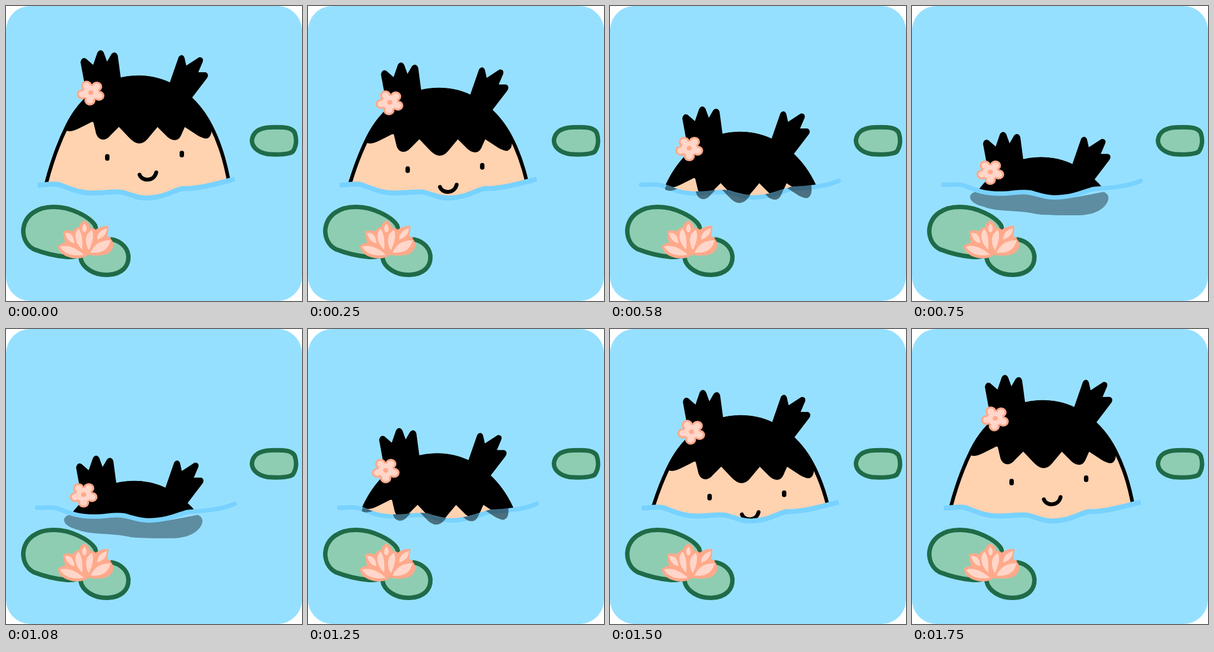
An HTML page that plays this animation: 532 by 530 pixels, repeating every 1.83 s.

```html
<!DOCTYPE html>
<html lang="en">
<head>
<meta charset="utf-8">
<title>Pond dip</title>
<style>
  html, body { margin: 0; width: 100%; height: 100%; overflow: hidden; background: #fff; }
  svg { display: block; width: 100vw; height: 100vh; }
  .pad { fill: #8ecdb2; stroke: #1f6b48; stroke-width: 8; stroke-linejoin: round; }
  .pale { fill: #ffd6c9; }
  .coral { fill: #ffa98b; }
  .hair { fill: #000; stroke: #000; stroke-width: 6; stroke-linejoin: round; }
</style>
</head>
<body>
<svg viewBox="0 0 532 530" xmlns="http://www.w3.org/2000/svg">
  <defs>
    <clipPath id="air"><path id="airPath"/></clipPath>
    <clipPath id="sea"><path id="seaPath"/></clipPath>
    <g id="hair" class="hair">
      <path d="M109 221 C135 165 180 128 238 128 C300 128 345 170 366 217 Q368 232 361 235
        Q357 236 346 230 L320 213 L312 231 Q309 238 303 238 Q298 238 292 233 L272 213
        L252 237 Q246 244 239 244 Q232 244 222 233 L203 213 L185 231 Q180 237 174 237
        Q168 237 165 229 L160 208 Q157 203 150 207 L130 217 Q116 224 109 221 Z"/>
      <path d="M146 150 L137 101 Q138 95 142 97 L158 111 L167 85 Q170 80 173 85 L181 107
        L192 88 Q196 84 198 90 L204 135 Z"/>
      <path d="M296 142 L313 93 Q316 89 318 94 L322 112 L348 95 Q353 95 350 101 L341 122
        L358 122 Q362 124 358 129 L332 163 Z"/>
    </g>
  </defs>

  <rect width="532" height="530" rx="44" fill="#96e0ff"/>

  <path id="shade" fill="#5e8da1" d="M105 340 Q110 332 125 334 C150 338 165 341 200 338
    C225 340 240 348 255 347 C290 346 310 340 345 334 Q354 338 353 347 C350 360 335 375 300 376
    C270 376 240 376 225 374 C190 366 150 370 130 361 C110 356 102 348 105 340 Z"/>

  <g clip-path="url(#air)">
    <g id="head">
      <path fill="#ffd2b0" stroke="#000" stroke-width="6.5" d="M66 350 C72 310 90 255 110 215
        C135 165 180 128 238 128 C300 128 345 170 368 215 C386 250 398 290 406 350"/>
      <use href="#hair"/>
      <rect x="178" y="266" width="8" height="12" rx="4"/>
      <rect x="312" y="260" width="8" height="12" rx="4"/>
      <path fill="none" stroke="#000" stroke-width="7" stroke-linecap="round"
        d="M240 303 C244 315 266 316 270 299"/>
    </g>
  </g>

  <path id="line" fill="none" stroke="#78d2ff" stroke-linejoin="round"/>
  <g id="sunk" clip-path="url(#sea)" opacity=".5"><use id="sunkHair" href="#hair"/></g>
  <g clip-path="url(#air)"><g id="bloom"></g></g>

  <path class="pad" d="M31 403 C33 375 58 360 88 361 C115 361 150 378 160 394
    C168 415 150 453 110 451 C85 449 68 444 50 437 C37 430 31 417 31 403 Z"/>
  <path class="pad" d="M134 453 C137 470 158 484 183 483 C208 482 221 468 220 449
    C218 430 200 419 185 419 C160 416 132 430 134 453 Z"/>
  <path class="pad" d="M442 241 C444 226 455 219 475 218 C500 217 514 218 519 228
    C523 240 522 253 515 262 C505 268 480 267 470 266 C452 263 442 253 442 241 Z"/>

  <path class="coral" d="M93 431 Q99 426 106 425 L102 405 Q112 401 121 405 Q123 398 131 397
    Q134 388 141 385 Q149 389 152 399 Q158 398 161 402 Q172 394 184 395 Q184 407 181 415
    Q190 413 188 418 Q194 424 193 432 Q190 443 178 447 Q160 450 147 447 Q140 455 120 453
    Q95 448 93 431 Z"/>
  <path class="pale" d="M141 391 Q147 397 144 405 Q141 408 138 405 Q135 397 141 391
    M130 400 Q139 410 137 438 Q121 422 126 406 Z
    M154 402 Q161 413 149 439 Q140 424 146 410 Z
    M106 408 Q121 405 123 426 Q111 425 106 408
    M181 399 Q182 413 164 420 Q163 405 181 399
    M97 432 Q118 427 140 447 Q108 452 97 432
    M188 421 Q162 420 152 443 Q182 446 188 421"/>
</svg>
<script>
const LOOP = 1830, STEPS = 22;
const $ = id => document.getElementById(id);

// step, head x, head y, flower x, flower y
const KEYS = [
  [0, 0, 0, 0, 0], [5, -5, 50, -10, 43], [7, -4, 101, -10, 100],
  [11, -8, 172, -13, 165], [13, -8, 148, -13, 142], [16, -5, 73, -12, 75],
  [18, -3, 30, -6, 29], [21, -3, 3, -3, 5], [22, 0, 0, 0, 0]
];

const CALM = "M57 322 C75 321 86 318 96 321 C120 330 135 337 160 336 C180 336 195 332 210 335 " +
  "C225 339 238 346 255 345 C290 343 300 331 318 328 C345 329 380 319 411 311";
const RIPPLE = "M56 321 C70 322 80 318 95 323 C118 332 130 337 160 337 C180 337 195 332 212 335 " +
  "C228 339 240 344 257 344 C290 343 305 335 325 329 C345 327 385 326 411 314";

function slope(k, c) {
  const a = KEYS[k - 1], b = KEYS[k + 1];
  if (!a || !b || KEYS[k][0] === 11) return 0;
  return (b[c] - a[c]) / (b[0] - a[0]);
}

function pose(step, c) {
  let k = 0;
  while (KEYS[k + 1][0] <= step) k++;
  const a = KEYS[k], b = KEYS[k + 1], w = b[0] - a[0];
  const u = (step - a[0]) / w, v = 1 - u;
  return a[c] * v * v * (1 + 2 * u) + b[c] * u * u * (3 - 2 * u)
    + w * u * v * (slope(k, c) * v - slope(k + 1, c) * u);
}

function petals(radius, cls) {
  let out = "";
  for (let n = 0; n < 5; n++) {
    const a = (n * 72 + 18) * Math.PI / 180;
    out += `<circle class="${cls}" cx="${15 * Math.cos(a)}" cy="${15 * Math.sin(a)}" r="${radius}"/>`;
  }
  return out;
}
$("bloom").innerHTML = petals(9.5, "coral") + petals(6, "pale") +
  '<circle class="pale" r="13"/><circle class="coral" r="4.5"/>';

function draw(time) {
  const step = Math.min(STEPS - 1, Math.floor(time % LOOP / (LOOP / STEPS) + 0.06));
  const [x, y, fx, fy] = [1, 2, 3, 4].map(c => pose(step, c));
  const calm = y < 40, deep = y > 115;
  const water = calm ? CALM : RIPPLE;
  const edge = water.replace("M", "L");

  $("head").setAttribute("transform", `translate(${x} ${y})`);
  $("sunkHair").setAttribute("transform", `translate(${x - 3} ${y + 6})`);
  $("bloom").setAttribute("transform",
    `translate(${152.5 + fx} ${155.5 + fy}) scale(1.05 .95) rotate(${calm ? 6 : 0})`);
  // The cut sits along the upper part of the water line.
  $("airPath").setAttribute("d", `M0 0 L0 321 ${edge} L532 311 L532 0 Z`);
  $("seaPath").setAttribute("d", `M0 530 L0 321 ${edge} L532 311 L532 530 Z`);
  $("seaPath").setAttribute("transform", "translate(0 -4)");
  $("line").setAttribute("d", water);
  $("line").setAttribute("stroke-width", calm || y < 60 ? 9 : 8);
  $("line").setAttribute("stroke-linecap", calm ? "butt" : "round");
  $("shade").style.display = deep ? "" : "none";
  $("sunk").style.display = deep || y < 80 ? "none" : "";
}

function tick() {
  draw(performance.now());
  requestAnimationFrame(tick);
}
tick();
</script>
</body>
</html>
```
